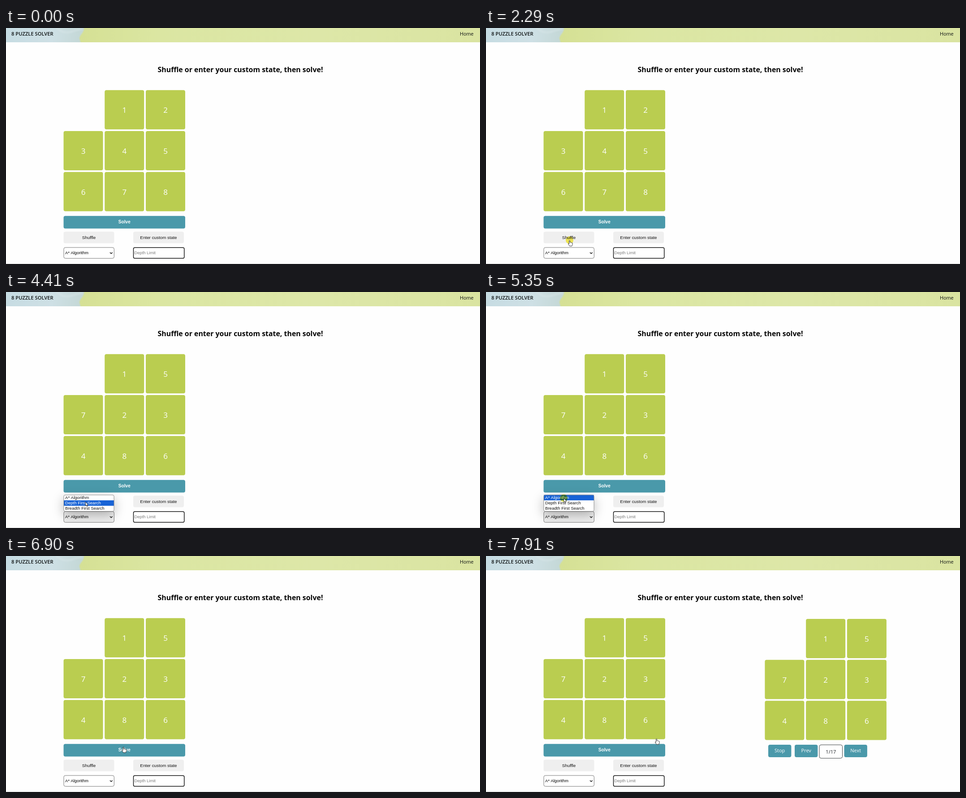
An HTML page with a canvas for the animation above (7990 ms loop, 1058 px wide and 529 px high).

```html
<!DOCTYPE html>
<html lang="en">
<head>
<meta charset="utf-8">
<title>8 Puzzle Solver</title>
<style>
html, body { margin: 0; width: 100%; height: 100%; overflow: hidden; background: #fefefe; }
canvas { display: block; }
</style>
</head>
<body>
<canvas id="stage" width="1058" height="529"></canvas>
<script>
const ctx = document.getElementById('stage').getContext('2d');
const LOOP = 7990;
const UI = '"Open Sans", "Noto Sans", sans-serif';
const FORM = '"Liberation Sans", Arial, sans-serif';
const GREEN = '#bacd50', TEAL = '#4a99aa', GREY = '#efefef';
const START = '012345678', MIXED = '015723486';
const OPTIONS = ['A* Algorithm', 'Depth First Search', 'Breadth First Search'];

// Pointer moves: first step, last step, number of steps, way points
const MOVES = [
  [440, 1300, 12, [[316, 470], [260, 430], [163, 416], [139.5, 440], [186.5, 475.5]]],
  [3010, 3310, 5, [[186.5, 475.5], [187.5, 503.5]]],
  [4010, 4410, 6, [[187.5, 503.5], [177, 470]]],
  [4710, 5030, 4, [[177, 470], [173.5, 462]]],
  [5720, 5970, 4, [[173.5, 462], [174, 462], [190, 459], [225, 446], [251.5, 438]]],
  [6030, 6360, 5, [[251.5, 438], [262, 427.5]]],
  [7220, 7680, 7, [[262, 427.5], [275.5, 431]]],
  [7910, 7910, 1, [[275.5, 431], [380.5, 409]]]
];
const CLICKS = [[2290, 2540], [3550, 3780], [5350, 5490], [6670, 6900]];

const within = (t, a, b) => t >= a && t < b;

function box(x, y, w, h, r, fill, stroke, line = 1) {
  ctx.beginPath();
  ctx.roundRect(x, y, w, h, r);
  if (fill) { ctx.fillStyle = fill; ctx.fill(); }
  if (stroke) { ctx.strokeStyle = stroke; ctx.lineWidth = line; ctx.stroke(); }
}

function label(s, x, y, font, color, align = 'center') {
  ctx.font = font;
  ctx.fillStyle = color;
  ctx.textAlign = align;
  ctx.fillText(s, x, y);
}

function shape(points, fill) {
  ctx.beginPath();
  points.forEach(p => ctx.lineTo(p[0], p[1]));
  ctx.closePath();
  if (fill) { ctx.fillStyle = fill; ctx.fill(); }
}

function pointer(t) {
  let pos = null;
  for (const [a, b, n, pts] of MOVES) {
    if (t < a) break;
    const k = t >= b ? n : Math.floor((t - a) / (b - a) * (n - 1)) + 1;
    const f = k / n * (pts.length - 1);
    const i = Math.min(Math.floor(f), pts.length - 2);
    const [p, q] = [pts[i], pts[i + 1]];
    pos = [p[0] + (q[0] - p[0]) * (f - i), p[1] + (q[1] - p[1]) * (f - i)];
  }
  return pos;
}

function header() {
  ctx.save();
  ctx.beginPath();
  ctx.rect(0, 0, 1058, 32);
  ctx.clip();
  let g = ctx.createLinearGradient(160, 0, 1058, 12);
  g.addColorStop(0, '#d5e094');
  g.addColorStop(0.2, '#dbe6a2');
  g.addColorStop(0.6, '#dde7a8');
  g.addColorStop(1, '#dae4a1');
  ctx.fillStyle = g;
  ctx.fillRect(0, 0, 1058, 32);
  g = ctx.createLinearGradient(0, 0, 175, 20);
  g.addColorStop(0, '#c6dce3');
  g.addColorStop(0.6, '#cee0e5');
  g.addColorStop(1, '#c3d7d5');
  ctx.filter = 'blur(1.2px)';
  ctx.beginPath();
  ctx.moveTo(-5, -5);
  ctx.lineTo(174, -5);
  ctx.bezierCurveTo(176, 12, 164, 14, 164, 24);
  ctx.lineTo(168, 37);
  ctx.lineTo(-5, 37);
  ctx.fillStyle = g;
  ctx.fill();
  ctx.filter = 'blur(2px)';
  ctx.beginPath();
  ctx.moveTo(110, -3);
  ctx.quadraticCurveTo(128, 16, 150, 7);
  ctx.quadraticCurveTo(164, 2, 172, 3);
  ctx.lineWidth = 2;
  ctx.strokeStyle = '#dbe8ea';
  ctx.stroke();
  ctx.restore();
  const y = 16.5;
  label('8 PUZZLE SOLVER', 12, y, '600 11.2px ' + UI, '#0b0f10', 'left');
  label('Home', 1043.5, y, '500 10.8px ' + UI, '#0b0f10', 'right');
}

function board(x, y, state) {
  [...state].forEach((d, i) => {
    if (d === '0') return;
    const tx = x + i % 3 * 91.75, ty = y + Math.floor(i / 3) * 91.75;
    box(tx, ty, 88, 88, 4, GREEN);
    label(d, tx + 44, ty + 51, '17px ' + UI, '#fff');
  });
}

function shuffleButton() {
  box(128.5, 456.5, 113, 26, 4, GREY);
  label('Shuffle', 185, 472.6, '9.85px ' + FORM, '#111');
}

function controls(t) {
  box(128.5, 421.3, 271.5, 28.2, 4, TEAL);
  label('Solve', 264.3, 438.3, 'bold 10.1px ' + FORM, '#fff');
  shuffleButton();
  box(284, 456.5, 113, 26, 4, GREY);
  label('Enter custom state', 340.4, 472.6, '9.85px ' + FORM, '#111');

  const open = within(t, 3550, 5490), focus = within(t, 5490, 6670);
  box(129, 492, 112.3, 24.3, 3.5, open ? GREY : '#fff', focus ? '#111' : '#767676', focus ? 1.7 : 1);
  label('A* Algorithm', 132, 507.2, '9.35px ' + FORM, '#000', 'left');
  ctx.beginPath();
  ctx.moveTo(232, 503);
  ctx.lineTo(234.8, 505.8);
  ctx.lineTo(237.6, 503);
  ctx.strokeStyle = '#111';
  ctx.lineWidth = 1.4;
  ctx.stroke();

  box(284.5, 492.2, 113.3, 24, 3, '#fff', '#151515', 1.5);
  label('Depth Limit', 286.5, 507.2, '9.4px ' + FORM, '#7a7a7a', 'left');
}

function dropdown(t, tip) {
  ctx.save();
  ctx.shadowColor = 'rgba(0,0,0,0.3)';
  ctx.shadowBlur = 26;
  ctx.shadowOffsetY = 8;
  // keep the shadow soft over the select below
  ctx.globalAlpha = 0.95;
  box(129, 455, 112, 36.5, 3, '#fff');
  ctx.restore();
  box(129, 455, 112, 36.5, 3, '#fff');
  if (t < 3630) {
    shuffleButton();
  } else {
    const row = tip[1] < 491 ? Math.max(0, Math.floor((tip[1] - 454.8) / 12.2)) : 0;
    OPTIONS.forEach((s, i) => {
      const y = 454.8 + i * 12.2;
      if (i === row) {
        ctx.fillStyle = '#1863d6';
        ctx.fillRect(129, y, 112, 12.2);
      }
      label(s, 132, y + 9.1, '9.57px ' + FORM, i === row ? '#fff' : '#111', 'left');
    });
  }
  box(129, 455, 112, 36.5, 3, null, '#858585', 0.9);
}

function solution() {
  board(622.4, 141, MIXED);
  const font = '11px ' + UI;
  [['Stop', 630], ['Prev', 689], ['Next', 799.5]].forEach(([s, x]) => {
    box(x, 423, 51.4, 28, 4, TEAL);
    label(s, x + 25.7, 440.3, font, '#fff');
  });
  box(744, 423.3, 51.5, 30, 4, '#fff', '#3c4043', 1);
  label('1/17', 769.8, 442.6, font, '#212529');
}

function isHand(t, [x, y]) {
  const over = (a, b, c, d) => x >= a && x <= c && y >= b && y <= d;
  if (within(t, 3550, 5720)) return false;
  return over(128, 421, 400, 450) || over(128, 456, 242, 483) ||
    over(284, 456, 397, 483) || over(128, 139, 400, 411);
}

function drawCursor(hand, [x, y]) {
  ctx.save();
  ctx.translate(x, y);
  ctx.lineJoin = 'round';
  ctx.lineWidth = 0.9;
  ctx.strokeStyle = '#222';
  if (hand) {
    ctx.beginPath();
    ctx.moveTo(-1, 8.4);
    ctx.lineTo(-1, 1.3);
    ctx.quadraticCurveTo(0, -0.3, 1, 1.3);
    ctx.lineTo(1, 5);
    ctx.quadraticCurveTo(2.2, 4.1, 3, 5.4);
    ctx.quadraticCurveTo(4.2, 4.7, 4.9, 6);
    ctx.quadraticCurveTo(6.6, 5.5, 6.6, 7.4);
    ctx.lineTo(6.4, 10);
    ctx.lineTo(5.2, 13.3);
    ctx.lineTo(0.2, 13.3);
    ctx.lineTo(-3, 8.9);
    ctx.quadraticCurveTo(-3.1, 7, -1, 8.4);
    ctx.closePath();
  } else {
    shape([[0.3, 0.3], [0.3, 9.3], [2.3, 7.5], [3.7, 10.8], [5.1, 10.2], [3.8, 7], [6.5, 7]]);
  }
  ctx.fillStyle = '#fff';
  ctx.fill();
  ctx.stroke();
  ctx.restore();
}

function glow([x, y]) {
  ctx.save();
  ctx.globalCompositeOperation = 'multiply';
  ctx.beginPath();
  ctx.arc(x, y, 8.5, 0, 2 * Math.PI);
  ctx.fillStyle = '#fbf257';
  ctx.fill();
  ctx.restore();
}

function draw(t) {
  const tip = pointer(t);
  ctx.fillStyle = '#fefefe';
  ctx.fillRect(0, 0, 1058, 529);
  header();
  label('Shuffle or enter your custom state, then solve!', 523, 99.2, 'bold 15.9px ' + UI, '#050505');
  board(128.5, 139.2, t < 2540 ? START : MIXED);
  controls(t);
  if (within(t, 3550, 5490)) dropdown(t, tip);
  if (t >= 7220) solution();
  ctx.fillStyle = '#d2d2d2';
  ctx.fillRect(0, 528, 1058, 1);
  if (tip) {
    if (CLICKS.some(([a, b]) => within(t, a, b))) glow(tip);
    drawCursor(isHand(t, tip), tip);
  }
}

const began = performance.now();
function tick() {
  draw((performance.now() - began) % LOOP);
  requestAnimationFrame(tick);
}
tick();
</script>
</body>
</html>
```
